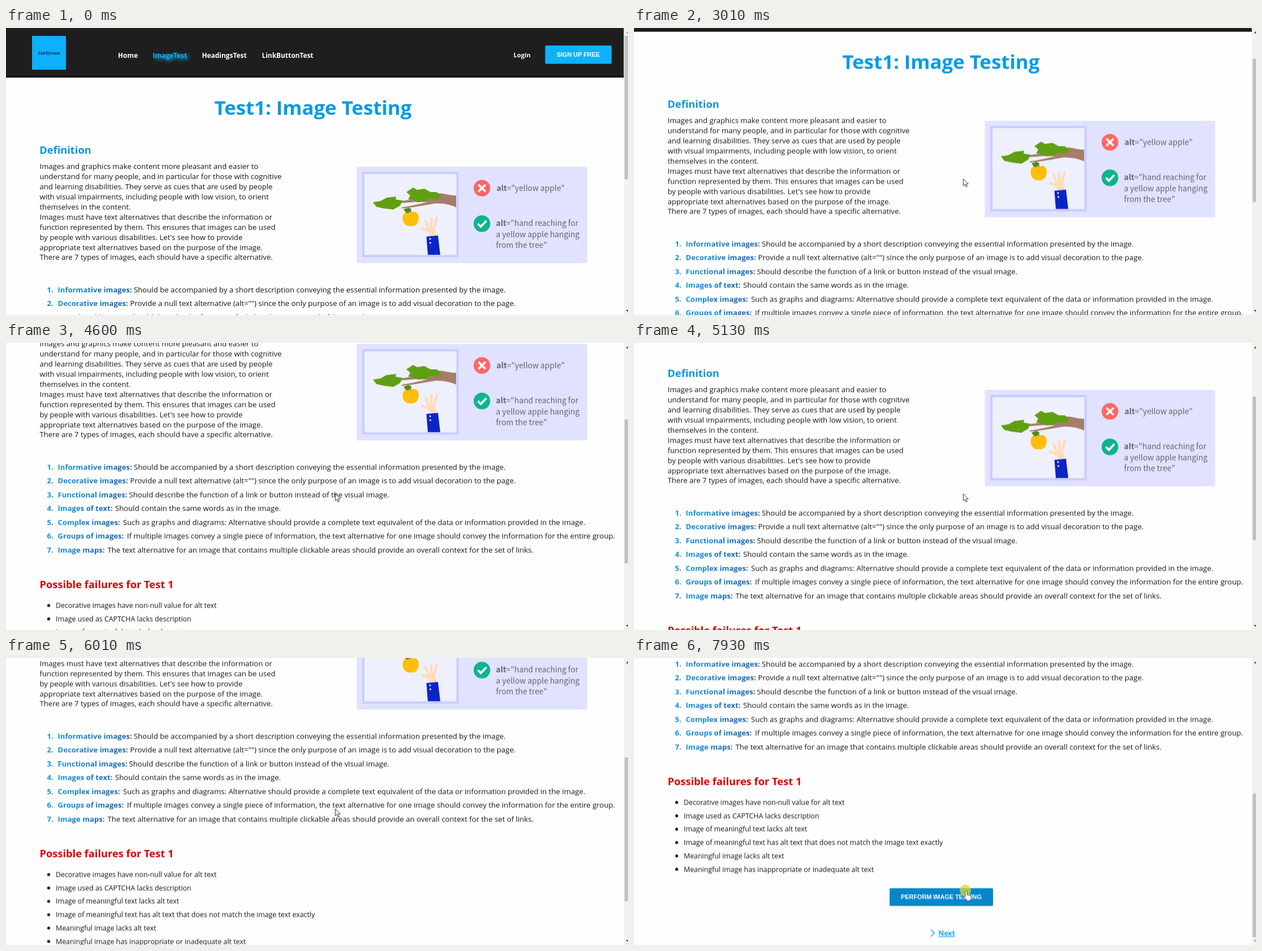
These frames come from a looping animation (1100 px wide and 509 px high, 8 s). An HTML page:

```html
<!DOCTYPE html>
<html lang="en">
<head>
<meta charset="utf-8">
<title>Image Testing</title>
<style>
  html, body { margin: 0; width: 100%; height: 100%; overflow: hidden; background: #fefefe; }
  svg { display: block; width: 1100px; height: 509px; font-family: "Open Sans", "Noto Sans", sans-serif; }
  .bold { font-weight: 700; }
  .nav { font-size: 11.9px; fill: #fff; }
  .active { fill: #12b0ff; filter: drop-shadow(3px 3px 3px #0db2ff); }
  .body { font-size: 13.1px; fill: #161616; }
  .item { font-size: 13.18px; fill: #161616; }
  .label { font-size: 13.1px; fill: url(#blue); }
  .fail { font-size: 12.37px; fill: #161616; }
  .heading { font-size: 18.3px; }
  .button { font: 700 10.85px "Liberation Sans", Arial, sans-serif; fill: #fff; text-anchor: middle; }
  .caption { font: 13.8px "Noto Sans CJK JP", "Noto Sans CJK SC", "Noto Sans CJK", "Open Sans", sans-serif; fill: #65656f; }

  .page, .thumb, .pointer, .arrow, .hand, .click, .hover, .up, .down { animation: 8s step-end infinite; }
  .page { animation-name: scroll; }
  .thumb { animation-name: thumb; }
  .pointer { animation-name: move; }
  .arrow { animation-name: arrow; }
  .hand { animation-name: hand; }
  .click { animation-name: click; }
  .hover { animation-name: hover; }
  .up { animation-name: up; }
  .down { animation-name: down; }

  @keyframes scroll {
    0% { transform: translateY(0); }
    37.625%, 66.625% { transform: translateY(-81.4px); }
    46.75%, 64.125%, 72.375% { transform: translateY(-162.8px); }
    57.5%, 73.25% { transform: translateY(-244.2px); }
    75.125% { transform: translateY(-325.6px); }
    80.875% { transform: translateY(-407px); }
    82.625%, 100% { transform: translateY(-453.5px); }
  }
  @keyframes thumb {
    0% { transform: translateY(0); }
    37.625%, 66.625% { transform: translateY(40.7px); }
    46.75%, 64.125%, 72.375% { transform: translateY(81.4px); }
    57.5%, 73.25% { transform: translateY(122.1px); }
    75.125% { transform: translateY(162.8px); }
    80.875% { transform: translateY(203.5px); }
    82.625%, 100% { transform: translateY(226.7px); }
  }
  @keyframes move {
    0% { transform: translate(1120px, 520px); }
    10.875% { transform: translate(1009px, 492px); }
    11.72% { transform: translate(919px, 445px); }
    12.57% { transform: translate(840px, 403px); }
    13.42% { transform: translate(772px, 367px); }
    14.26% { transform: translate(714px, 337px); }
    15.11% { transform: translate(667px, 312px); }
    15.96% { transform: translate(629px, 292px); }
    16.81% { transform: translate(603px, 278px); }
    17.65% { transform: translate(587px, 270px); }
    18.5% { transform: translate(582px, 267px); }
    92.5% { transform: translate(583px, 289px); }
    93.53% { transform: translate(584px, 340px); }
    94.56% { transform: translate(585px, 386px); }
    95.59% { transform: translate(586px, 409px); }
    96.625%, 100% { transform: translate(586px, 412px); }
  }
  @keyframes arrow { 0% { opacity: 1; } 95.59%, 100% { opacity: 0; } }
  @keyframes hand { 0% { opacity: 0; } 95.59%, 100% { opacity: 1; } }
  @keyframes click { 0% { opacity: 0; } 99.125%, 100% { opacity: .75; } }
  @keyframes hover { 0% { fill: #0db2ff; } 95.59% { fill: #0b9ee6; } 96.625%, 100% { fill: #0787cb; } }
  @keyframes up { 0% { fill: #a3a3a3; } 37.625%, 100% { fill: #505050; } }
  @keyframes down { 0% { fill: #505050; } 82.625%, 100% { fill: #a3a3a3; } }
</style>
</head>
<body>
<svg xmlns="http://www.w3.org/2000/svg" width="1100" height="509">
  <defs>
    <linearGradient id="blue"><stop stop-color="#0f92dc"/><stop offset="1" stop-color="#1a60a8"/></linearGradient>
  </defs>

  <g class="page">
    <rect width="1092.5" height="88" fill="#1e1e1e"/>
    <rect y="84.5" width="1092.5" height="3.5" fill="#181818"/>
    <rect x="46" y="14" width="60" height="60" fill="#0db0fb"/>
    <text x="57" y="46.5" font-family="Noto Serif, serif" font-size="6.6" font-weight="700" fill="#1d1d5c">FairlyExam</text>
    <g class="nav bold">
      <text x="198" y="53">Home</text>
      <text x="259.5" y="53" class="active">ImageTest</text>
      <text x="346.5" y="53">HeadingsTest</text>
      <text x="452.5" y="53">LinkButtonTest</text>
      <text x="897.5" y="52" style="font-size:11.2px">Login</text>
    </g>
    <rect x="953.5" y="31" width="117.5" height="32.5" rx="2" fill="#0db2ff"/>
    <text class="button" x="1012" y="51">SIGN UP FREE</text>

    <text class="bold" x="368.5" y="154" font-size="34.75" fill="#069ae4">Test1: Image Testing</text>
    <text class="bold heading" x="59.3" y="223" fill="#0d94dd">Definition</text>
    <g id="intro" class="body"></g>

    <g>
      <rect x="620.5" y="246" width="407" height="171" fill="#e0e2ff"/>
      <rect x="632" y="257" width="166.5" height="147.5" fill="#eff0fd"/>
      <path fill="#a47e6a" d="M796 297C782 297 771 291 760 294L735 302 690 308V311L730 308 745 309C730 312 715 316 700 318V320C725 318 745 313 760 311 775 311 785 313 796 318Z"/>
      <path fill="#5f9f13" d="M649 309L662 307 673 301 690 299 689 304 701 306 697 315 685 322 668 320 655 317ZM708 291L720 283 727 287 740 285 751 291 762 291 770 299 765 304 748 303 742 308 728 309 721 305 711 304 715 297Z"/>
      <path fill="none" stroke="#8b604c" stroke-width="1.6" d="M711 319Q717 322 716 330"/>
      <path fill="#ffbe0b" d="M716 328C722 323 730 327 730 336 730 346 724 353 716 351 707 353 701 345 701.5 336 702 327 710 324 716 328Z"/>
      <path fill="#538b16" d="M703 322Q710 317 717 321 715 329 708 328Z"/>
      <g fill="none" stroke="#ffdcb8" stroke-width="4.6" stroke-linecap="round">
        <path d="M748 360L736 356M747 355L742 341M752 353V338M757 354L762 337"/>
        <path stroke-width="12" d="M753 359L755 366"/>
      </g>
      <path fill="#0a25c6" d="M743.5 370L764 368 768 402.500H746Z"/>
      <g fill="#fff"><circle cx="750" cy="374" r="1.6"/><circle cx="750.5" cy="381" r="1.6"/></g>
      <rect x="632" y="257" width="166.5" height="147.5" fill="none" stroke="#c9cdff" stroke-width="4"/>
      <circle cx="841.7" cy="284" r="14.7" fill="#ff6766"/>
      <circle cx="841.7" cy="347" r="14.7" fill="#0cb58a"/>
      <g fill="none" stroke="#fff" stroke-width="3.6">
        <path d="M835.5 277.8L848 290.3M848 277.8L835.5 290.3"/>
        <path d="M834.5 347L839.8 352.3 849.5 342"/>
      </g>
      <g class="caption">
        <text x="867.5" y="289"><tspan class="bold">alt</tspan>="yellow apple"</text>
        <text x="866.5" y="351"><tspan class="bold">alt</tspan>="hand reaching for</text>
        <text x="866.5" y="370.5">a yellow apple hanging</text>
        <text x="866.5" y="390">from the tree"</text>
      </g>
    </g>

    <g id="types"></g>
    <text class="bold heading" x="59.5" y="678.5" fill="#d60000">Possible failures for Test 1</text>
    <g id="fails" class="fail"></g>
    <rect class="hover" x="452" y="861.7" width="183" height="31.6" rx="2" fill="#0db2ff"/>
    <text class="button" x="543.5" y="881">PERFORM IMAGE TESTING</text>
    <path d="M525 935.5L531.5 941.5 525 947.5" fill="none" stroke="#12a6f3" stroke-width="1.4"/>
    <text class="bold" x="538.5" y="946" font-size="12.2" fill="#0fa8f5" text-decoration="underline">Next</text>
  </g>

  <rect x="1093" width="7" height="509" fill="#f1f1f1"/>
  <rect class="thumb" x="1094" y="13.8" width="6" height="254.5" fill="#c1c1c1"/>
  <path class="up" d="M1100 5.5L1104 9.5H1096Z"/>
  <path class="down" d="M1100 504L1104 500H1096Z"/>

  <g class="pointer">
    <circle class="click" r="10" fill="#dcda22"/>
    <path class="arrow" d="M.3 .5V13L3.2 10.3 5.2 15 7.2 14.2 5.2 9.6H9.2Z" fill="#fff" stroke="#222" stroke-width=".9"/>
    <path class="hand" d="M0 2.5Q0 1 1.5 1T3 2.5V8L9 9.5Q10.5 10 10.5 12L9.5 16V18.5H2V16.5L-3 11.5Q-3.5 9.5-1.5 10L0 11.5Z" fill="#fff" stroke="#333" stroke-width=".8"/>
  </g>
</svg>
<script>
  const intro = [
    "Images and graphics make content more pleasant and easier to",
    "understand for many people, and in particular for those with cognitive",
    "and learning disabilities. They serve as cues that are used by people",
    "with visual impairments, including people with low vision, to orient",
    "themselves in the content.",
    "Images must have text alternatives that describe the information or",
    "function represented by them. This ensures that images can be used",
    "by people with various disabilities. Let's see how to provide",
    "appropriate text alternatives based on the purpose of the image.",
    "There are 7 types of images, each should have a specific alternative."
  ];
  const types = [
    ["Informative images:", 226, "Should be accompanied by a short description conveying the essential information presented by the image."],
    ["Decorative images:", 219.5, "Provide a null text alternative (alt=\"\") since the only purpose of an image is to add visual decoration to the page."],
    ["Functional images:", 217.5, "Should describe the function of a link or button instead of the visual image."],
    ["Images of text:", 193, "Should contain the same words as in the image."],
    ["Complex images:", 207, "Such as graphs and diagrams: Alternative should provide a complete text equivalent of the data or information provided in the image."],
    ["Groups of images:", 214, "If multiple images convey a single piece of information, the text alternative for one image should convey the information for the entire group."],
    ["Image maps:", 179.5, "The text alternative for an image that contains multiple clickable areas should provide an overall context for the set of links."]
  ];
  const fails = [
    "Decorative images have non-null value for alt text",
    "Image used as CAPTCHA lacks description",
    "Image of meaningful text lacks alt text",
    "Image of meaningful text has alt text that does not match the image text exactly",
    "Meaningful image lacks alt text",
    "Meaningful image has inappropriate or inadequate alt text"
  ];

  function add(parent, tag, attrs, text = "") {
    const el = document.createElementNS("http://www.w3.org/2000/svg", tag);
    for (const key in attrs) el.setAttribute(key, attrs[key]);
    el.textContent = text;
    document.getElementById(parent).append(el);
  }

  intro.forEach((line, i) => add("intro", "text", { x: 59.5, y: 250 + i * 17.94 }, line));

  types.forEach(([label, x, text], i) => {
    const y = 469 + i * 24.42;
    add("types", "text", { x: 72.5, y, class: "label bold", style: "fill:#118cd6" }, `${i + 1}.`);
    add("types", "text", { x: 91.5, y, class: "label bold" }, label);
    add("types", "text", { x, y, class: "item" }, text);
  });

  fails.forEach((line, i) => {
    const y = 714 + i * 23.7;
    add("fails", "circle", { cx: 75.5, cy: y - 4.3, r: 2.6 });
    add("fails", "text", { x: 88, y }, line);
  });
</script>
</body>
</html>
```
